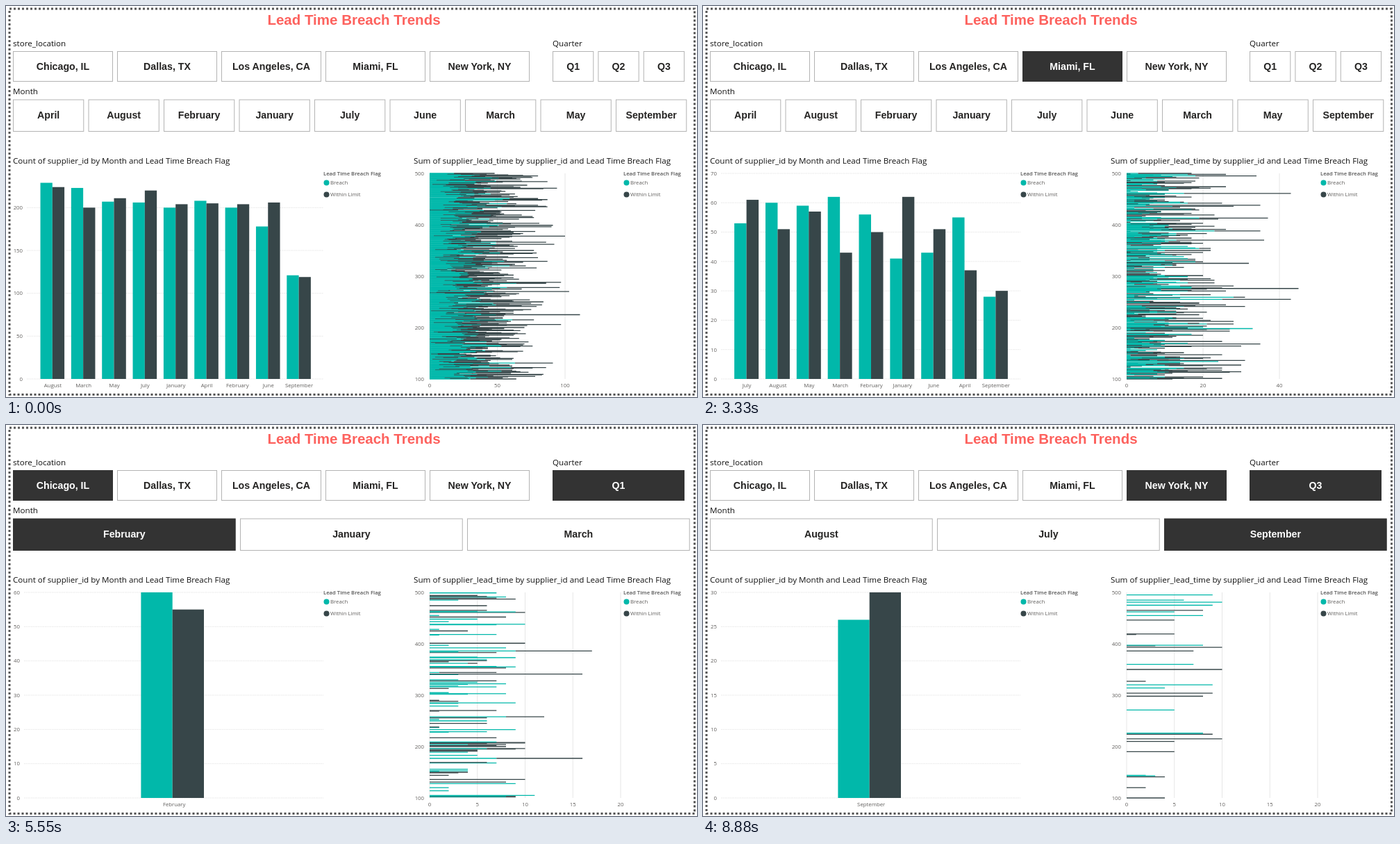
Recreate the animation shown at these times as an HTML page. Size 995 by 563 pixels, loop 9990 ms.

```html
<!DOCTYPE html>
<html lang="en">
<head>
<meta charset="utf-8">
<title>Lead Time Breach Trends</title>
<style>
  html, body { margin: 0; width: 100%; height: 100%; overflow: hidden; background: #fff; }
  svg { display: block; width: 995px; height: 563px; }
  text { font-family: "Open Sans", "Noto Sans", sans-serif; }
  .title, .button { font-family: "Liberation Sans", Arial, sans-serif; font-weight: bold; text-anchor: middle; }
  .title { font-size: 20.5px; fill: #fd625e; }
  .button { font-size: 14.2px; }
  .head { font-size: 11.65px; fill: #111; }
  .small { font-size: 7.8px; fill: #605e5c; }
  .legend { font-size: 7.7px; font-weight: 600; fill: #555; }
  .grid { stroke: #e6e6e6; stroke-width: 1; fill: none; }
</style>
</head>
<body>
<svg viewBox="0 0 995 563" xmlns="http://www.w3.org/2000/svg"><g id="frame"></g><g id="view"></g></svg>
<script>
const HOLD = 1110, TEAL = '#01b8aa', DARK = '#374649';
const TOP = 241, BASE = 537, LEFT = 610, RIGHT = 885;
const SUPPLIERS = 500, FIRST_ID = 100, ROW = (BASE - TOP) / (SUPPLIERS - FIRST_ID);
const CITIES = ['Chicago, IL', 'Dallas, TX', 'Los Angeles, CA', 'Miami, FL', 'New York, NY'];
const QUARTERS = {
  Q1: ['February', 'January', 'March'],
  Q2: ['April', 'June', 'May'],
  Q3: ['August', 'July', 'September']
};
const MONTHS = Object.values(QUARTERS).flat().sort();

// Suppliers per month as [breach, within limit], in display order.
const ALL = {
  August: [229, 224], March: [223, 200], May: [207, 211], July: [206, 220], January: [200, 204],
  April: [208, 205], February: [200, 204], June: [178, 206], September: [121, 119]
};
const LOS_ANGELES = {
  August: [63, 73], April: [57, 59], January: [63, 52], July: [56, 54], March: [58, 53],
  February: [53, 51], May: [56, 45], June: [42, 60], September: [28, 29]
};
const MIAMI = {
  July: [53, 61], August: [60, 51], May: [59, 57], March: [62, 43], February: [56, 50],
  January: [41, 62], June: [43, 51], April: [55, 37], September: [28, 30]
};
const share = Object.fromEntries(MONTHS.map(m => [m, ALL[m].map(v => Math.round(v * .27))]));
const CHICAGO = { ...share, February: [60, 55] };
const NEW_YORK = { ...share, September: [26, 30] };

const STATES = [
  { data: ALL, span: 141 },
  { data: LOS_ANGELES, city: 2, span: 60 },
  { data: share, city: 1, span: 50 },
  { data: MIAMI, city: 3, span: 50 },
  { data: MIAMI, city: 3, quarter: 'Q1', span: 30 },
  { data: CHICAGO, city: 0, quarter: 'Q1', month: 'February', span: 20 },
  { data: CHICAGO, city: 0, quarter: 'Q2', span: 30 },
  { data: MIAMI, city: 3, quarter: 'Q2', span: 30 },
  { data: NEW_YORK, city: 4, quarter: 'Q3', month: 'September', span: 20 }
];

const text = (x, y, cls, str, extra = '') => `<text x="${x}" y="${y}" class="${cls}" ${extra}>${str}</text>`;
const rect = (x, y, w, h, fill, extra = '') =>
  `<rect x="${x}" y="${y}" width="${w}" height="${h}" fill="${fill}" ${extra}/>`;
const line = (x, y, length, color) =>
  length ? `<path d="M${x.toFixed(1)} ${y.toFixed(2)}h${length.toFixed(1)}" stroke="${color}"/>` : '';
const ticks = (max, step) => Array.from({ length: Math.floor(max / step) + 1 }, (_, i) => i * step);

function random(seed) {
  return () => {
    seed = (seed + 0x6d2b79f5) | 0;
    let t = Math.imul(seed ^ (seed >>> 15), 1 | seed);
    t = (t + Math.imul(t ^ (t >>> 7), 61 | t)) ^ t;
    return ((t ^ (t >>> 14)) >>> 0) / 4294967296;
  };
}

function visibleCounts({ data, quarter, month }) {
  const months = month ? [month] : quarter ? QUARTERS[quarter] : MONTHS;
  return Object.entries(data).filter(([name]) => months.includes(name));
}

function buttons(names, picked, x, y, width, height, pitch) {
  return names.map((name, i) => {
    const on = name === picked, left = x + i * pitch;
    return rect(left + .5, y + .5, width - 1, height - 1, on ? '#333' : '#fff', `stroke="${on ? '#333' : '#b3b3b3'}"`) +
      text(left + width / 2, y + height / 2 + 4.5, 'button', name, `fill="${on ? '#fff' : '#252423'}"`);
  }).join('');
}

function slicers({ city, quarter, month }) {
  const quarters = month ? [quarter] : Object.keys(QUARTERS);
  const months = quarter ? QUARTERS[quarter] : MONTHS;
  const [width, pitch] = quarter ? [320.7, 327] : [102.3, 108.5];
  return buttons(CITIES, CITIES[city], 10, 65, 144, 44, 150) +
    buttons(quarters, quarter, 787, 65, month ? 190 : 59.3, 44, 65.4) +
    buttons(months, month, 10, 134.5, width, 46.5, pitch);
}

function columns(state) {
  const counts = visibleCounts(state), n = counts.length;
  const max = Math.max(...counts.flatMap(([, pair]) => pair));
  const step = max > 100 ? 50 : max > 70 ? 20 : max > 30 ? 10 : 5;
  const round = Math.min(step, 20), top = Math.ceil(max / round) * round;
  const scale = (BASE - TOP) / top, wide = top > 100;
  const pitch = n < 9 ? 119.6 : wide ? 44.35 : 44.85;
  const width = n < 9 ? 45.3 : pitch * .39;
  const middle = wide ? 244.2 : n < 9 ? 239.7 : 242;
  const labelShift = n < 9 ? 2.5 : .5;
  let out = '';
  for (const v of ticks(top, step)) {
    const y = BASE - v * scale;
    out += `<path class="grid" stroke-dasharray="1.5 1" d="M${wide ? 30 : 26} ${y}H457"/>` +
      text(wide ? 24 : 20, y + 2.8, 'small', v, 'text-anchor="end"');
  }
  counts.forEach(([name, pair], i) => {
    const x = middle + (i - (n - 1) / 2) * pitch, [breach, within] = pair.map(v => v * scale);
    out += rect(x - width, BASE - breach, width, breach, TEAL) + rect(x, BASE - within, width, within, DARK) +
      text(x + labelShift, 548.5, 'small', name, 'text-anchor="middle"');
  });
  return out;
}

function rows(state, index) {
  const { span } = state, rng = random(71 + index * 13), scale = (RIGHT - LEFT) / span;
  const counts = visibleCounts(state);
  // Mean orders per supplier, from the share of suppliers that have any.
  const rates = [0, 1].map(flag => counts.reduce((sum, [, pair]) => sum - Math.log(1 - pair[flag] / SUPPLIERS), 0));
  const leadTime = rate => {
    let days = 0;
    for (let p = rng(); p > Math.exp(-rate); p *= rng()) days += 1 + Math.floor(rng() * 10);
    return days;
  };
  let out = '';
  const tick = span > 100 ? 50 : span > 40 ? 20 : span > 20 ? 10 : 5;
  for (const v of ticks(span, tick)) {
    const x = LEFT + v * scale;
    out += `<path class="grid" d="M${x} ${TOP}V${BASE}"/>` + text(x, 548.5, 'small', v, 'text-anchor="middle"');
  }
  for (let id = FIRST_ID; id <= SUPPLIERS; id += 100)
    out += text(602, BASE - (id - FIRST_ID) * ROW + 2.8, 'small', id, 'text-anchor="end"');

  out += '<g stroke-width="1.3">';
  for (let id = FIRST_ID; id <= SUPPLIERS; id++) {
    const y = BASE - (id - FIRST_ID) * ROW;
    const [breach, within] = rates.map(rate => leadTime(rate) * scale);
    const room = RIGHT - LEFT - breach;
    out += line(LEFT, y, breach, TEAL) + line(LEFT + breach, y, Math.min(within, room), DARK);
  }
  return out + '</g>';
}

const legend = x => text(x, 243.5, 'legend', 'Lead Time Breach Flag') +
  [['Breach', TEAL, 254.5], ['Within Limit', DARK, 271.5]].map(([name, color, y]) =>
    `<circle cx="${x + 4.5}" cy="${y}" r="4" fill="${color}"/>` + text(x + 10, y + 2.8, 'small', name)).join('');

document.getElementById('frame').innerHTML =
  rect(5, 4, 986.5, 555.5, 'none', 'stroke="#555" stroke-width="3" stroke-dasharray="3 3"') +
  text(501, 27, 'title', 'Lead Time Breach Trends') +
  text(10, 58, 'head', 'store_location') + text(787, 58, 'head', 'Quarter') + text(10, 127, 'head', 'Month') +
  text(10, 227, 'head', 'Count of supplier_id by Month and Lead Time Breach Flag') +
  text(587, 227, 'head', 'Sum of supplier_lead_time by supplier_id and Lead Time Breach Flag') +
  legend(457) + legend(889);

const views = STATES.map((state, i) => slicers(state) + columns(state) + rows(state, i));
const view = document.getElementById('view');
const start = performance.now();
let shown = -1;

function draw() {
  const now = Math.floor((performance.now() - start) / HOLD) % views.length;
  if (now !== shown) view.innerHTML = views[shown = now];
  requestAnimationFrame(draw);
}
draw();
</script>
</body>
</html>
```
